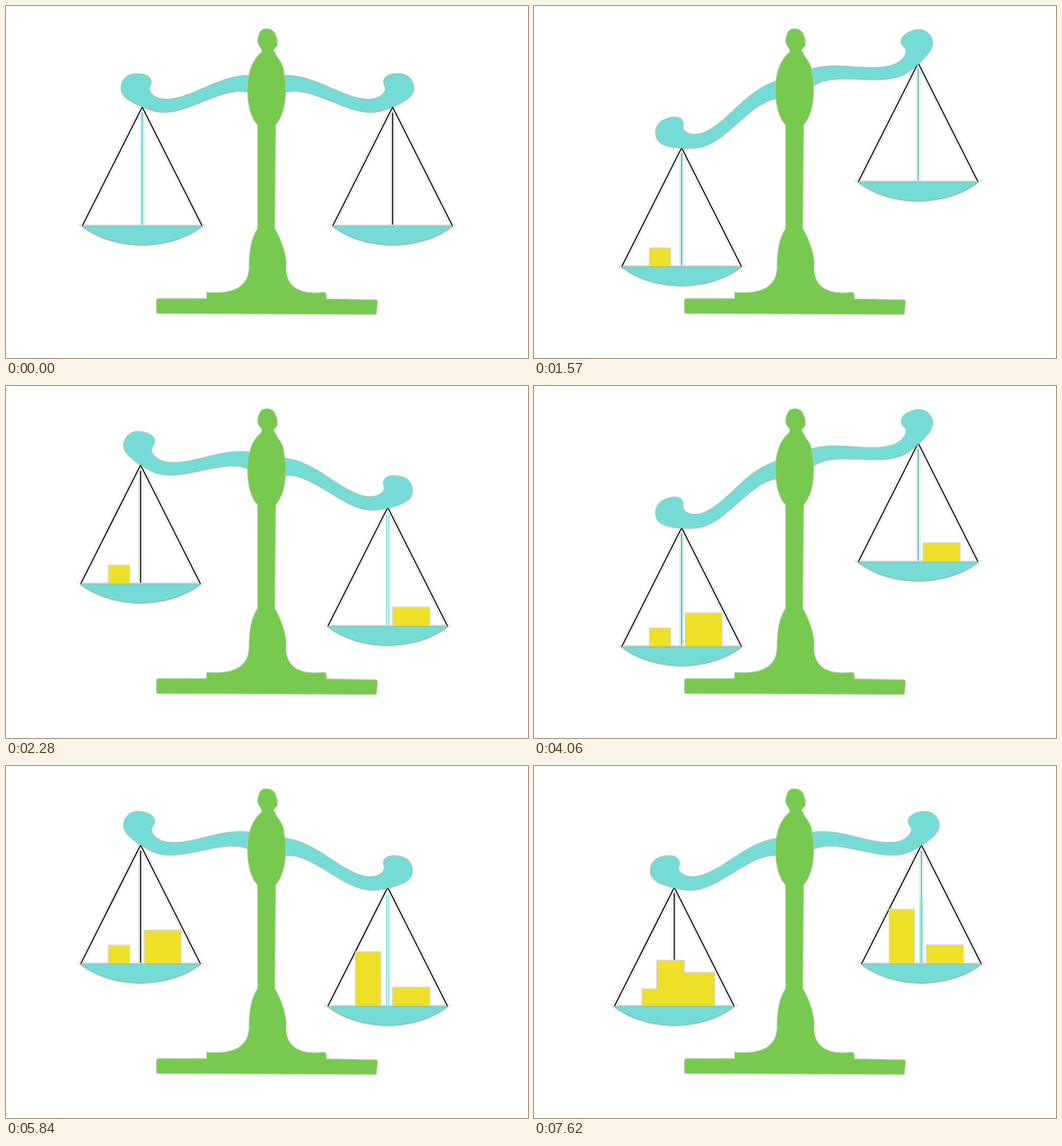
An HTML page that plays this animation: 640 by 432 pixels, repeating every 8000 ms.

```html
<!DOCTYPE html>
<html lang="en">
<head>
<meta charset="utf-8">
<title>Balance scale</title>
<style>
html, body { margin: 0; width: 100%; height: 100%; overflow: hidden; background: #fff; }
svg { display: block; width: 640px; height: 432px; }

.teal { fill: #75dcd5; stroke: #8aaaa7; stroke-width: .7; }
.green { fill: #78c94f; stroke: #b3cfa6; stroke-width: .8; stroke-linejoin: round; }
.weight { fill: #eedf28; stroke: #d9d9d2; stroke-width: 2.4; stroke-linejoin: round; paint-order: stroke; }
.edge, .gap, .core { fill: none; }
.edge { stroke: #d8d8d8; stroke-width: 5.4; }
.gap { stroke: #fff; stroke-width: 4.2; }
.core { stroke: #000; stroke-width: 1.4; }
.rim .edge { stroke-width: 3.4; }
.rim .gap { stroke-width: 2; }

.beam, .pan, .pan * { animation: 8s step-end infinite; }
.beam { transform-origin: 320.5px 105px; animation-name: tilt; }
.left { animation-name: left; }
.right { animation-name: right; }
.left .rod .core { animation-name: leftCore; }
.right .rod .core { animation-name: rightCore; }
.right .rod .edge { animation-name: rightEdge; }
.right .rod .gap { animation-name: rightGap; }
.pan .w1 { animation-name: w1; }
.pan .w2 { animation-name: w2; }
.pan .w3 { animation-name: w3; }
.pan .w4 { animation-name: w4; }
.pan .w5 { animation-name: w5; }

@keyframes tilt {
  0% { transform: rotate(0deg); }
  6.25%, 50.75% { transform: rotate(-19.7deg); }
  28.5%, 73% { transform: rotate(9.8deg); }
  95.25%, 100% { transform: rotate(-9.8deg); }
}
/* Whole pixels keep the thin cords sharp. */
@keyframes left {
  0% { transform: translate(167px, 270px); }
  6.25%, 50.75% { transform: translate(181px, 320px); }
  28.5%, 73% { transform: translate(165px, 243px); }
  95.25%, 100% { transform: translate(172px, 295px); }
}
@keyframes right {
  0% { transform: translate(474px, 270px); }
  6.25%, 50.75% { transform: translate(471px, 216px); }
  28.5%, 73% { transform: translate(468px, 295px); }
  95.25%, 100% { transform: translate(475px, 243px); }
}
@keyframes leftCore {
  0% { stroke: #75dcd5; stroke-width: 2.6; }
  6.25%, 50.75% { stroke: #68c3bd; stroke-width: 2.2; }
  28.5%, 73%, 95.25%, 100% { stroke: #000; stroke-width: 1.4; }
}
@keyframes rightCore {
  0% { stroke: #000; stroke-width: 1.4; }
  6.25%, 50.75%, 95.25%, 100% { stroke: #68c3bd; stroke-width: 1.8; }
  28.5%, 73% { stroke: #b9ece8; stroke-width: 1; }
}
@keyframes rightEdge {
  0%, 6.25%, 50.75%, 95.25%, 100% { stroke: #d8d8d8; stroke-width: 5.4; }
  28.5%, 73% { stroke: #75dcd5; stroke-width: 4; }
}
@keyframes rightGap {
  0%, 6.25%, 50.75%, 95.25%, 100% { stroke-width: 4.2; }
  28.5%, 73% { stroke-width: 2; }
}
@keyframes w1 { 0%, 95.25%, 100% { visibility: hidden; } 6.25% { visibility: visible; } }
@keyframes w2 { 0% { visibility: hidden; } 28.5%, 100% { visibility: visible; } }
@keyframes w3 { 0%, 95.25%, 100% { visibility: hidden; } 50.75% { visibility: visible; } }
@keyframes w4 { 0% { visibility: hidden; } 73%, 100% { visibility: visible; } }
@keyframes w5 { 0% { visibility: hidden; } 95.25%, 100% { visibility: visible; } }
</style>
</head>
<body>
<svg viewBox="0 0 640 432">
  <defs>
    <path id="cords" d="M-73.500 0L0-146L73.500 0"/>
    <path id="rod" d="M0-146V0"/>
    <path id="dish" d="M-74 0H74C34 31-34 31-74 0Z"/>
    <path id="arm" d="M320.500 85H300C269 85 245 101 222 109C200 117 186 116 178 107C174 102 176 100 178 95C179 87 172 83 160 83C147 83 141 92 141 101C141 111 151 117 167 124C179 129 187 131 197 130.500C225 129 257 106 286 104.500L298 105.500H320.500Z"/>
    <g id="strings">
      <use href="#cords" class="edge"/><use href="#cords" class="gap"/><use href="#cords" class="core"/>
    </g>
    <g id="plate">
      <g class="rim"><use href="#dish" class="edge"/><use href="#dish" class="gap"/></g>
      <use href="#dish" class="teal"/>
    </g>
  </defs>

  <g class="pan left">
    <g class="rod">
      <use href="#rod" class="edge"/><use href="#rod" class="gap"/><use href="#rod" class="core"/>
    </g>
    <use href="#plate"/>
    <use href="#strings"/>
    <path class="weight w1" d="M-39-22.500H-14V0H-39Z"/>
    <path class="weight w3" d="M5-41H49V0H5Z"/>
    <path class="weight w5" d="M-39 0V-21H-21V-56H12V-41H49V0Z"/>
    <use href="#dish" class="teal"/>
  </g>

  <g class="pan right">
    <g class="rod">
      <use href="#rod" class="edge"/><use href="#rod" class="gap"/><use href="#rod" class="core"/>
    </g>
    <path class="w5" d="M0-81V0" stroke="#75dcd5" stroke-width="3"/>
    <use href="#plate"/>
    <use href="#strings"/>
    <path class="weight w2" d="M6.500-23H51V0H6.500Z"/>
    <path class="weight w4" d="M-39-66.500H-9V0H-39Z"/>
    <use href="#dish" class="teal"/>
  </g>

  <g class="beam teal">
    <use href="#arm"/>
    <use href="#arm" transform="matrix(-1 0 0 1 641 0)"/>
  </g>

  <path class="green" d="M315 28.500Q320 27 325 29Q330 31 331 37L332.500 41V49Q330 51 328 54Q331 61 337 69Q341 75 341 84Q343 90 343 103C343 122 338 138 330.500 146L329.500 273C337 286 343 302 343.500 316C341 339 354 352 378 352L391 351.500Q393 352 393 359.500L454 360.500Q456 361.500 455.500 364L454 378.500L186 377.500Q184 377 184.500 375V360.500Q185 359 187 359H246V351.500H248C281 354 298 343 298 320C298 300 301 284 308.500 273V146C300 138 296 120 296 102C296 82 302 66 313 57Q315 54 312 51Q308 47 308.500 42Q310 31 315 28.500Z"/>
</svg>
</body>
</html>
```
